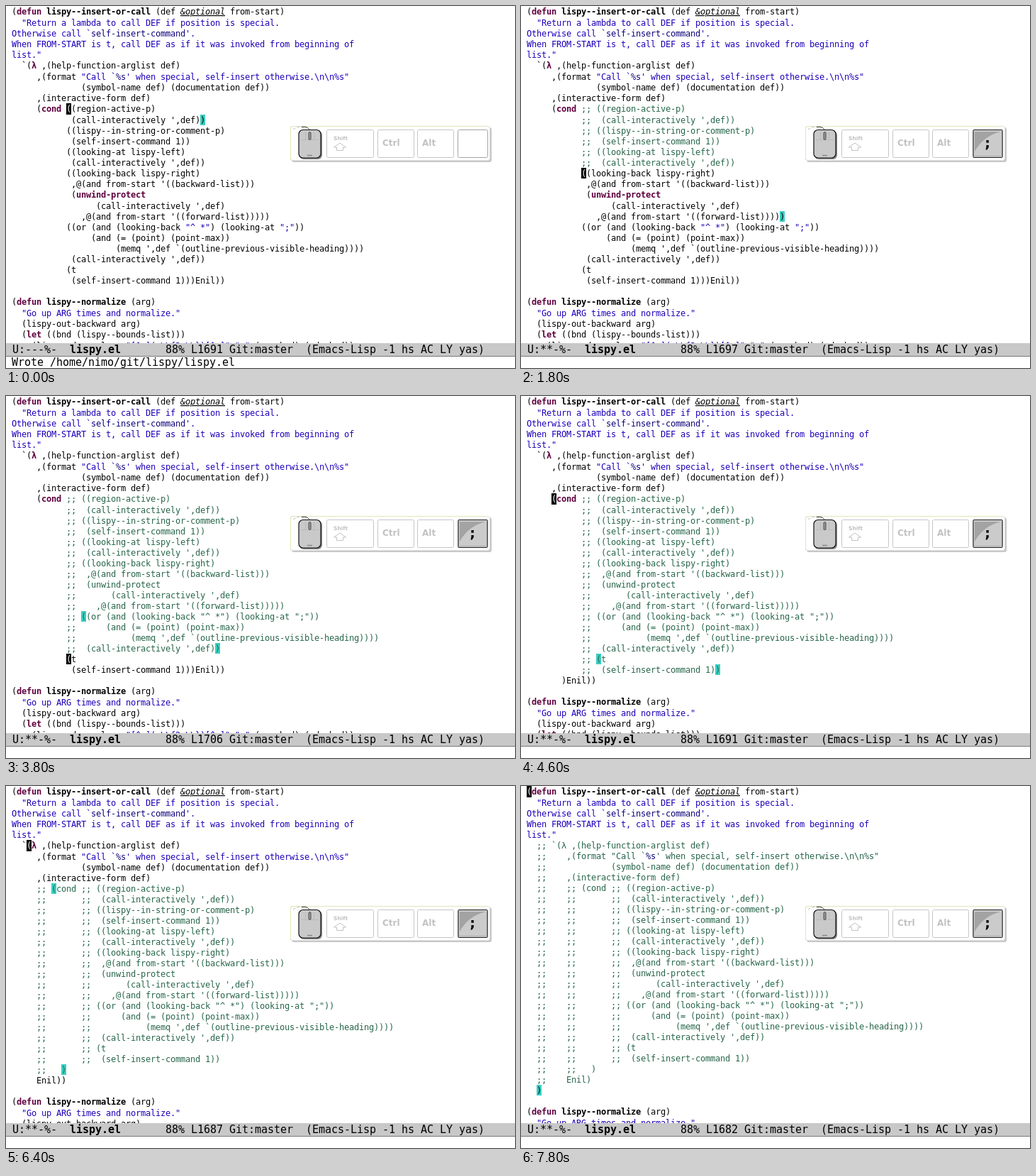
An HTML page for the animation above (8000 ms loop, 718x510 px).

```html
<!DOCTYPE html>
<html lang="en">
<head>
<meta charset="utf-8">
<title>Commenting Lisp clauses</title>
<style>
html, body { margin: 0; width: 100%; height: 100%; overflow: hidden; background: #fff; }
svg { display: block; width: 718px; height: 510px; }
text { white-space: pre; }
.code { font: 12px "DejaVu Sans Mono", monospace; }
.bar { font: 15px "DejaVu Sans Mono", monospace; }
.key { fill: #60003f; font-weight: bold; }
.fn { font-weight: bold; }
.type { font-style: italic; text-decoration: underline; }
.str { fill: #1c00b8; }
.const { fill: #0c0078; }
.com { fill: #266549; }
.cell { shape-rendering: crispEdges; }
.cap { fill: #fff; stroke: #c6c6c6; }
.label { font: bold 12px "DejaVu Sans", sans-serif; fill: #c2c2c2; }
</style>
</head>
<body>
<svg viewBox="0 0 718 510">
  <defs><clipPath id="win"><rect width="718" height="475"/></clipPath></defs>
  <rect width="718" height="510" fill="#fff"/>
  <g clip-path="url(#win)"><g id="code" class="code"></g></g>

  <g id="keys">
    <rect x="403" y="171" width="282" height="49" rx="3" fill="#c8c8c8"/>
    <rect x="401.5" y="169.5" width="281" height="48" rx="3" fill="#fff" stroke="#dedede"/>
    <path d="M401.5 217V172Q402 169.500 404 169.500H680" fill="none" stroke="#e4e4b8"/>
    <path d="M405 174Q410 170 417 170" fill="none" stroke="#bbb" stroke-dasharray="4 2"/>
    <path d="M417 170.500Q428 169 428.500 177" fill="none" stroke="#333"/>
    <rect x="414" y="176" width="32" height="40" rx="6" fill="#888"/>
    <rect x="413" y="174.500" width="31" height="39.500" rx="6" fill="#c9c9c9" stroke="#111" stroke-width="1.200"/>
    <path d="M416 188.500H441M422.500 177V188M434.500 177V188" fill="none" stroke="#bababa"/>
    <rect x="427" y="177.500" width="3" height="11" rx="1.500" fill="#999" stroke="#333" stroke-width=".8"/>
    <path d="M425 210.500H432" stroke="#888" stroke-width="1.500"/>
    <rect class="cap" x="452.500" y="174.500" width="66" height="39" rx="2"/>
    <rect class="cap" x="524.500" y="174.500" width="51" height="39" rx="2"/>
    <rect class="cap" x="580.500" y="174.500" width="51" height="39" rx="2"/>
    <text class="label" x="462" y="189" style="font-size:7.500px">Shift</text>
    <path d="M471 193L479.500 199H475.500V203.500H466.500V199H462.500Z" fill="#fff" stroke="#c2c2c2"/>
    <text class="label" x="531" y="197">Ctrl</text>
    <text class="label" x="587" y="197">Alt</text>
    <rect class="cap" x="637.500" y="174.500" width="42" height="39" rx="2" style="stroke:#a4a4a4"/>
    <g id="pressed">
      <rect x="638" y="174.500" width="41" height="39" rx="1" fill="#cbcbcb" stroke="#222"/>
      <path d="M640 177H677Q652 183 640 205Z" fill="#a3a3a3"/>
      <path d="M640 211.500H677" stroke="#aaa"/>
      <text x="658" y="200" text-anchor="middle" style="font:bold 19px 'DejaVu Sans',sans-serif">;</text>
    </g>
  </g>

  <rect class="cell" y="475" width="718" height="18" fill="#c8c8c8"/>
  <rect class="cell" y="493" width="718" height="1" fill="#777"/>
  <g class="bar">
    <text id="flags" x="9" y="489"></text>
    <text class="fn" x="90" y="489">lispy.el</text>
    <text id="info" x="225" y="489"></text>
    <text id="echo" x="8" y="507">Wrote /home/nimo/git/lispy/lispy.el</text>
  </g>
</svg>
<script>
const LOOP = 8000, PAREN_DELAY = 200, KEY_HOLD = 800, TOP_LINE = 1682;
const CW = 7, LEFT = 8, BASE = 12, DOC_END = 4;
const $ = id => document.getElementById(id);

const source = String.raw`(defun lispy--insert-or-call (def &optional from-start)
  "Return a lambda to call DEF if position is special.
Otherwise call ~self-insert-command'.
When FROM-START is t, call DEF as if it was invoked from beginning of
list."
  ~(λ ,(help-function-arglist def)
     ,(format "Call ~%s' when special, self-insert otherwise.\n\n%s"
              (symbol-name def) (documentation def))
     ,(interactive-form def)
     (cond ((region-active-p)
            (call-interactively ',def))
           ((lispy--in-string-or-comment-p)
            (self-insert-command 1))
           ((looking-at lispy-left)
            (call-interactively ',def))
           ((looking-back lispy-right)
            ,@(and from-start '((backward-list)))
            (unwind-protect
                 (call-interactively ',def)
              ,@(and from-start '((forward-list)))))
           ((or (and (looking-back "^ *") (looking-at ";"))
                (and (= (point) (point-max))
                     (memq ',def ~(outline-previous-visible-heading))))
            (call-interactively ',def))
           (t
            (self-insert-command 1)))Enil))

(defun lispy--normalize (arg)
  "Go up ARG times and normalize."
  (lispy-out-backward arg)
  (let ((bnd (lispy--bounds-list)))
    (lispy--do-replace "[^ ]( \\{2,\\})[^ ]" " " (car bnd) (cdr bnd))`;

// Each press: time, comment column, indent of split-off text, next cursor (row, column).
const presses = [
  [400, 11, 0, 11, 11], [1000, 11, 0, 13, 11], [1600, 11, 0, 15, 11], [2600, 11, 0, 20, 11],
  [3800, 11, 0, 24, 11], [4600, 11, 7, 9, 5], [6400, 5, 5, 5, 3], [7000, 2, 2, 0, 0]
];

function closing(rows, [r, c]) {
  let depth = 0;
  for (; r < rows.length; r++, c = 0)
    for (; c < rows[r].length; c++) {
      if (rows[r][c] === "(") depth++;
      if (rows[r][c] === ")" && --depth === 0) return [r, c];
    }
}

function commentOut({ rows, cursor }, [time, col, indent, ...next]) {
  const [r, c] = cursor, [er, ec] = closing(rows, cursor);
  const out = rows.slice(), rest = out[er].slice(ec + 1);
  out[er] = out[er].slice(0, ec + 1);
  for (let i = r; i <= er; i++) out[i] = out[i].slice(0, col) + ";; " + out[i].slice(col);
  if (rest) out.splice(er + 1, 0, " ".repeat(indent) + rest);
  return { time, rows: out, cursor: next, stale: [[r, c + 3], [er, ec + 3]] };
}

const states = [{ time: -LOOP, rows: source.replace(/~/g, "`").split("\n"), cursor: [9, 11] }];
for (const p of presses) states.push(commentOut(states.at(-1), p));

const TOKEN = /(?<com>;; .*)|(?<str>"[^"]*"?)|(?<key>(?<=\()(?:defun|cond|unwind-protect|let|λ)(?=\s|$))|(?<fn>(?<=defun )\S+)|(?<type>&optional)/g;

// Marks quoted names inside strings and comments.
function quoted(s, cls, col) {
  const parts = s.split(/(?<=`)([\w%-]+)(?=')/);
  return parts.map((text, i) => {
    const run = { text, col, cls: i % 2 ? "const" : cls };
    col += text.length;
    return run;
  });
}

function runs(line, row) {
  if (row > 0 && row <= DOC_END) return quoted(line, "str", 0);
  const out = [];
  let at = 0;
  for (const m of line.matchAll(TOKEN)) {
    out.push({ text: line.slice(at, m.index), col: at, cls: "" });
    const cls = Object.keys(m.groups).find(k => m.groups[k]);
    out.push(...quoted(m[0], cls, m.index));
    at = m.index + m[0].length;
  }
  out.push({ text: line.slice(at), col: at, cls: "" });
  return out;
}

const esc = s => s.replace(/&/g, "&amp;").replace(/</g, "&lt;");
const textAt = (x, y, s, attr) => `<text x="${x}" y="${y}" ${attr}>${esc(s)}</text>`;

function drawCode({ rows, cursor }, marks, showCursor) {
  const tops = [0], lines = rows.map(runs);
  lines.forEach((l, i) => tops.push(tops[i] + (l.some(t => t.cls === "key") ? 16 : 15)));
  const cell = ([r, c], fill) =>
    `<rect class="cell" x="${LEFT + c * CW}" y="${tops[r]}" width="${CW}" height="${tops[r + 1] - tops[r]}" fill="${fill}"/>`;

  let svg = marks.map(p => cell(p, "#38cfc2")).join("");
  lines.forEach((line, r) => {
    for (const { text, col, cls } of line) {
      const lead = text.length - text.trimStart().length;
      if (text.trim())
        svg += textAt(LEFT + (col + lead) * CW, tops[r] + BASE, text.trim(), `class="${cls}"`);
    }
  });
  if (showCursor) {
    const [r, c] = cursor;
    svg += cell(cursor, "#000") + textAt(LEFT + c * CW, tops[r] + BASE, rows[r][c], 'fill="#fff"');
  }
  return svg;
}

// Keeps both fonts on a whole-pixel character grid.
function snapGrid(group, width) {
  const probe = document.createElementNS("http://www.w3.org/2000/svg", "text");
  probe.textContent = "x".repeat(100);
  group.append(probe);
  const advance = probe.getComputedTextLength() / 100;
  probe.remove();
  group.style.letterSpacing = (width - advance).toFixed(4) + "px";
}

let last = "";
function render(t) {
  const k = states.findLastIndex(s => s.time <= t), s = states[k], age = t - s.time;
  const stale = k > 0 && age < PAREN_DELAY;
  const blink = t >= 5200 && t < 5600;
  const final = k === states.length - 1;
  const pressed = k > 0 && (final || age < KEY_HOLD);
  const id = [k, stale, blink, pressed].join();
  if (id === last) return;
  last = id;
  const marks = stale ? s.stale : [s.cursor, closing(s.rows, s.cursor)];
  $("code").innerHTML = drawCode(s, marks, !blink);
  $("pressed").style.display = pressed ? "" : "none";
  $("flags").textContent = k ? "U:**-%-" : "U:---%-";
  $("info").textContent = `88% L${TOP_LINE + s.cursor[0]} Git:master  (Emacs-Lisp -1 hs AC LY yas)`;
  $("echo").style.display = k ? "none" : "";
}

snapGrid($("code"), CW);
snapGrid(document.querySelector(".bar"), 9);
const start = performance.now();
function tick() {
  render((performance.now() - start) % LOOP);
  requestAnimationFrame(tick);
}
tick();
</script>
</body>
</html>
```
